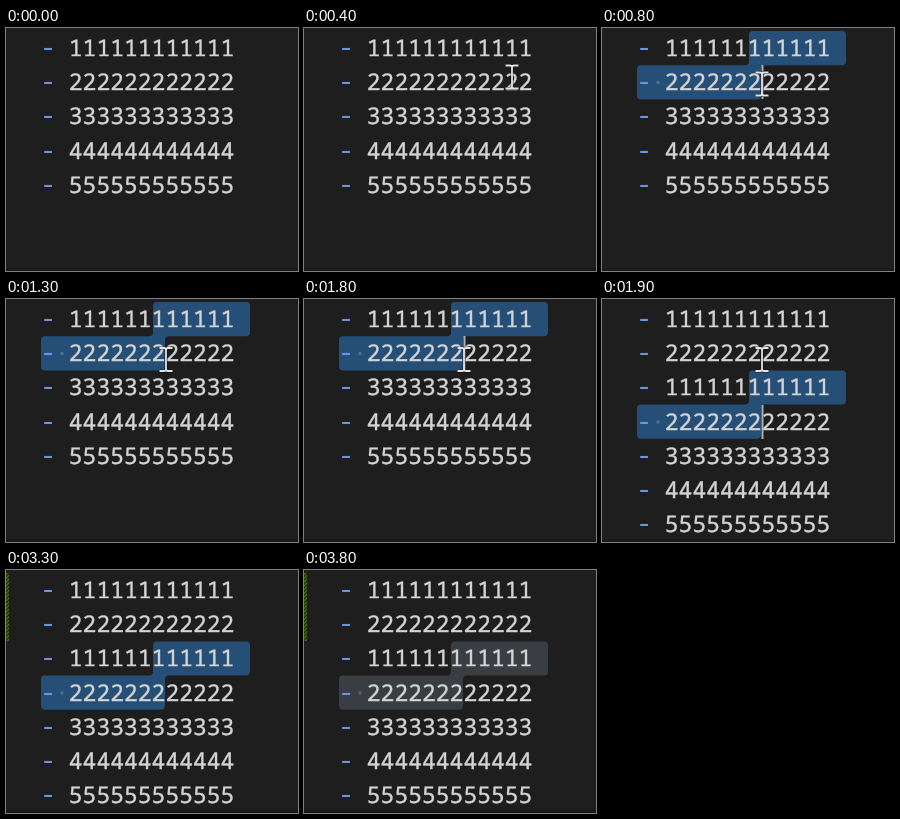
An HTML page that plays this animation: 292x243 px, repeating every 3.9 s.

```html
<!DOCTYPE html>
<html lang="en">
<head>
<meta charset="utf-8">
<title>Copy lines down</title>
<style>
  html, body { margin: 0; width: 100%; height: 100%; overflow: hidden; background: #1e1e1e; }
  svg { display: block; width: 292px; height: 243px; }
  text {
    font: 23px "Noto Sans Mono", "DejaVu Sans Mono", monospace;
    fill: #d4d4d4;
    stroke: #d4d4d4;
    stroke-width: .4px;
    text-rendering: geometricPrecision;
  }
  .dash { fill: #6796e6; stroke: none; font-size: 26px; text-anchor: middle; }
</style>
</head>
<body>
<svg viewBox="0 0 292 243">
  <defs>
    <pattern id="hatch" width="2.65" height="3" patternUnits="userSpaceOnUse" patternTransform="rotate(45)">
      <rect width="1.33" height="3" fill="#487e02"/>
    </pattern>
  </defs>
  <rect y="240" width="292" height="3" fill="#1e1719"/>
  <rect id="added" y="3" width="3" height="68" fill="url(#hatch)"/>
  <g id="selection">
    <path id="highlight"/>
    <circle cx="56" cy="51.5" r="1.7" fill="#e3e4e2" fill-opacity=".22"/>
  </g>
  <g id="lines"></g>
  <rect id="caret" x="159.5" width="2" height="34" fill="#aeafad"/>
  <g id="pointer" fill="none">
    <path id="beamEdge" stroke="#000" stroke-opacity=".6" stroke-width="3"/>
    <path id="beam" stroke="#e4e4e4" stroke-width="1.8"/>
  </g>
</svg>
<script>
const LOOP = 3900, STEP = 100, ROW = 34.2, TOP = 3;
const COPY_AT = 1900, BLUR_AT = 3800;
const $ = id => document.getElementById(id);
const show = (node, on) => node.setAttribute("visibility", on ? "visible" : "hidden");
const within = (t, spans) => spans.some(([from, to]) => t >= from && t < to);

// Two-row selection outline with rounded outer and inner corners
function selectionPath(left, start, end, right, r = 4) {
  const turn = (sweep, dx, dy) => `a${r} ${r} 0 0 ${sweep} ${dx * r} ${dy * r}`;
  return `M${start + r} 0H${right - r}` + turn(1, 1, 1) +
    `V${ROW - r}` + turn(1, -1, 1) + `H${end + r}` + turn(0, -1, 1) +
    `V${2 * ROW - r}` + turn(1, -1, 1) + `H${left + r}` + turn(1, -1, -1) +
    `V${ROW + r}` + turn(1, 1, -1) + `H${start - r}` + turn(0, 1, -1) +
    `V${r}` + turn(1, 1, -1) + "Z";
}
$("highlight").setAttribute("d", selectionPath(35, 147, 159, 244));

const beamPath = "M-6.5-11.5H-2Q0-11.5 0-9.5Q0-11.5 2-11.5H6.5M0-10V10M-6.5 11.5H-2Q0 11.5 0 9.5Q0 11.5 2 11.5H6.5";
for (const id of ["beam", "beamEdge"]) $(id).setAttribute("d", beamPath);

function drawLines(digits) {
  $("lines").innerHTML = [...digits].map((digit, i) => {
    const y = Math.round(28 + i * ROW);
    return `<text class="dash" x="42" y="${y}">-</text>` +
      `<text x="62.8" y="${y}">${digit.repeat(12)}</text>`;
  }).join("");
}

// [time, x, y]; without a position the pointer is hidden
const pointerStops = [
  [0], [200, 263, 82.5], [300, 245, 70], [400, 208, 49], [500, 168, 31],
  [600, 146, 25], [700, 148, 24.5], [800, 160, 56], [900, 160, 58.5],
  [1100, 160, 60.5], [2400], [3000, 258, 17.5], [3100]
];
const caretSpans = [[800, 1300], [1800, 2400], [2900, 3300]];

let shownDigits = "";
function render(time) {
  const t = Math.floor(time % LOOP / STEP) * STEP;
  const copied = t >= COPY_AT;
  const shift = copied ? 2 * ROW : 0;

  const digits = copied ? "1212345" : "12345";
  if (digits !== shownDigits) drawLines(shownDigits = digits);

  show($("added"), t >= 2200);
  show($("selection"), t >= 800);
  $("selection").setAttribute("transform", `translate(0 ${TOP + shift})`);
  $("highlight").setAttribute("fill", t >= BLUR_AT ? "#3a3d41" : "#264f78");

  show($("caret"), within(t, caretSpans));
  $("caret").setAttribute("y", Math.round(TOP + ROW + shift));

  const [, x, y] = pointerStops.findLast(stop => stop[0] <= t);
  show($("pointer"), x !== undefined);
  if (x !== undefined) $("pointer").setAttribute("transform", `translate(${x} ${y})`);
}

function frame() {
  render(performance.now());
  requestAnimationFrame(frame);
}
frame();
</script>
</body>
</html>
```
